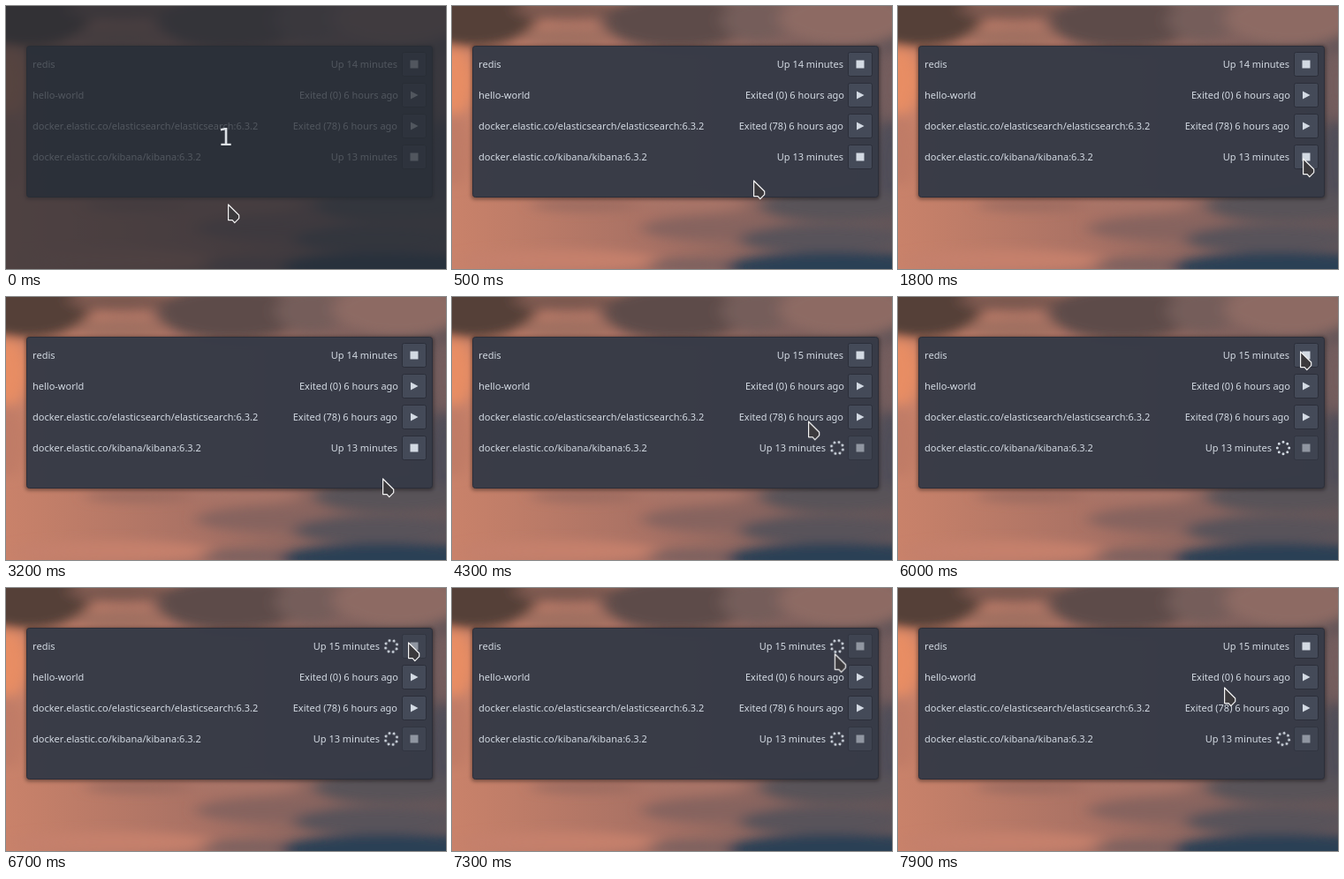
These frames come from a looping animation (498x298 px, 8 s). An HTML page:

```html
<!DOCTYPE html>
<html lang="en">
<head>
<meta charset="utf-8">
<title>Container list</title>
<style>
  html, body { margin: 0; width: 100%; height: 100%; overflow: hidden; background: #6d5552; }
  svg { display: block; width: 498px; height: 298px; }

  .label { font: 11px "Noto Sans", "Open Sans", sans-serif; font-kerning: none; fill: #d3dae3; }
  .status { text-anchor: end; }
  .count { font: 27px "DejaVu Sans", sans-serif; fill: #dde1e6; text-anchor: middle; }
  .face { fill: #444a58; stroke: #2b2e39; }
  .icon { fill: #d3dae3; }

  /* One loop is 8 s; 1.25% is one 100 ms tick. */
  .veil, .minute14, .minute15, .press, .shift, .spin, .dim, .face.off, .pointer {
    animation: 8s step-end infinite;
  }
  .veil { animation-name: veil; }
  .minute14 { animation-name: before; }
  .minute15 { animation-name: after; }
  .spin { opacity: 0; }

  .kibana .press { animation-name: pressKibana; }
  .kibana .shift { animation-name: shiftKibana; }
  .kibana .spin { animation-name: after; }
  .kibana .dim { animation-name: dimKibana; }
  .kibana .off { animation-name: offKibana; }

  .redis .press { animation-name: pressRedis; }
  .redis .shift { animation-name: shiftRedis; }
  .redis .spin { animation-name: spinRedis; }
  .redis .dim { animation-name: dimRedis; }
  .redis .off { animation-name: offRedis; }

  .ring { animation: turn 1s steps(10) infinite; }
  .pointer { animation-name: travel; }

  @keyframes veil { 0% { opacity: 1 } 2.5%, 100% { opacity: 0 } }
  @keyframes before { 0% { opacity: 1 } 45%, 100% { opacity: 0 } }
  @keyframes after { 0% { opacity: 0 } 45%, 100% { opacity: 1 } }

  @keyframes pressKibana { 0%, 36.25%, 100% { opacity: 0 } 33.75% { opacity: 1 } }
  @keyframes shiftKibana { 0% { transform: none } 45%, 100% { transform: translateX(-20px) } }
  @keyframes dimKibana { 0% { opacity: 1 } 45%, 100% { opacity: .55 } }
  @keyframes offKibana { 0% { fill: #444a58; stroke: #2b2e39 } 45%, 100% { fill: #3f4451; stroke: #313540 } }

  @keyframes pressRedis { 0%, 75%, 100% { opacity: 0 } 72.5% { opacity: 1 } }
  @keyframes shiftRedis { 0%, 93.75%, 100% { transform: none } 81.25% { transform: translateX(-20px) } }
  @keyframes spinRedis { 0%, 93.75%, 100% { opacity: 0 } 81.25% { opacity: 1 } }
  @keyframes dimRedis { 0%, 93.75%, 100% { opacity: 1 } 81.25% { opacity: .55 } }
  @keyframes offRedis { 0%, 93.75%, 100% { fill: #444a58; stroke: #2b2e39 } 81.25% { fill: #3f4451; stroke: #313540 } }

  @keyframes turn { to { transform: rotate(360deg) } }

  @keyframes travel {
    0% { transform: translate(252px, 225px) }
    1.25% { transform: translate(252px, 225px); animation-timing-function: steps(4) }
    6.25% { transform: translate(342px, 198px); animation-timing-function: steps(5) }
    12.5% { transform: translate(451px, 173px); animation-timing-function: steps(2) }
    15% { transform: translate(452px, 168px) }
    16.25% { transform: translate(452px, 168px); animation-timing-function: steps(5) }
    22.5% { transform: translate(459px, 173px) }
    35% { transform: translate(459px, 173px); animation-timing-function: steps(4) }
    40% { transform: translate(427px, 206px); animation-timing-function: steps(2) }
    42.5% { transform: translate(428px, 208px) }
    46.25% { transform: translate(428px, 208px); animation-timing-function: steps(7) }
    55% { transform: translate(400px, 130px); animation-timing-function: steps(8) }
    65% { transform: translate(452px, 62px); animation-timing-function: steps(2) }
    67.5% { transform: translate(456px, 62px) }
    88.75% { transform: translate(455px, 62px); animation-timing-function: steps(8) }
    98.75%, 100% { transform: translate(370px, 113px) }
  }
</style>
</head>
<body>
<svg viewBox="0 0 498 298">
  <defs>
    <linearGradient id="dusk" x2="1" y2="0">
      <stop offset="0" stop-color="#c9826a"/>
      <stop offset=".45" stop-color="#a87164"/>
      <stop offset="1" stop-color="#635558"/>
    </linearGradient>
    <filter id="soft" x="-50%" y="-50%" width="200%" height="200%">
      <feGaussianBlur stdDeviation="9 6"/>
    </filter>
    <filter id="shade" x="-10%" y="-10%" width="120%" height="120%">
      <feGaussianBlur stdDeviation="2"/>
    </filter>
    <rect id="stop" x="-4.5" y="-4.5" width="9" height="9"/>
    <path id="play" d="M-4 -4.5 L4.5 0 L-4 4.5Z"/>
    <rect id="button" x="-13.5" y="-13.5" width="27" height="27" rx="2"/>
    <circle id="dots" r="6.7" pathLength="8" fill="none" stroke="#d3dae3" stroke-width="3"
      stroke-linecap="round" stroke-dasharray="0 1"/>
  </defs>

  <!-- Sunset clouds -->
  <rect width="498" height="298" fill="url(#dusk)"/>
  <g filter="url(#soft)">
    <ellipse cx="25" cy="12" rx="70" ry="34" fill="#553f39"/>
    <ellipse cx="130" cy="4" rx="60" ry="12" fill="#7c584f"/>
    <ellipse cx="130" cy="36" rx="50" ry="12" fill="#a06f60"/>
    <ellipse cx="255" cy="18" rx="85" ry="30" fill="#5d4b49"/>
    <ellipse cx="345" cy="16" rx="40" ry="25" fill="#755d5a"/>
    <ellipse cx="445" cy="14" rx="75" ry="30" fill="#8d6a64"/>
    <ellipse cx="2" cy="85" rx="24" ry="38" fill="#e88d63"/>
    <ellipse cx="2" cy="165" rx="22" ry="40" fill="#c07c66"/>
    <ellipse cx="496" cy="90" rx="20" ry="40" fill="#755d5d"/>
    <ellipse cx="496" cy="180" rx="20" ry="50" fill="#4f4d59"/>
    <ellipse cx="150" cy="226" rx="60" ry="7" fill="#9c6c60"/>
    <ellipse cx="270" cy="224" rx="65" ry="8" fill="#a97567"/>
    <ellipse cx="290" cy="252" rx="75" ry="13" fill="#86645f"/>
    <ellipse cx="435" cy="226" rx="85" ry="18" fill="#585258"/>
    <ellipse cx="420" cy="264" rx="95" ry="16" fill="#59535a"/>
    <ellipse cx="120" cy="288" rx="115" ry="12" fill="#c5806c"/>
    <ellipse cx="270" cy="294" rx="50" ry="8" fill="#7b605f"/>
    <ellipse cx="435" cy="296" rx="125" ry="17" fill="#2c4055"/>
  </g>

  <!-- Panel -->
  <rect x="22" y="45" width="462" height="174" rx="4" opacity=".4" filter="url(#shade)"/>
  <rect x="23.5" y="45.5" width="459" height="171" rx="3" fill="#383c48" fill-opacity=".96" stroke="#2b2e39"/>

  <g class="redis">
    <text class="label" x="30" y="70">redis</text>
    <g class="shift">
      <text class="label status minute14" x="443" y="70">Up 14 minutes</text>
      <text class="label status minute15" x="443" y="70">Up 15 minutes</text>
    </g>
    <g class="spin" transform="translate(436 66)"><g class="ring"><use href="#dots"/></g></g>
    <g transform="translate(462 66)">
      <use href="#button" class="face off"/>
      <use href="#button" class="press" fill="#5294e2" stroke="#2b2e39" opacity="0"/>
      <use href="#stop" class="icon dim"/>
    </g>
  </g>

  <g>
    <text class="label" x="30" y="105">hello-world</text>
    <text class="label status" x="444" y="105">Exited (0) 6 hours ago</text>
    <g transform="translate(462 101)">
      <use href="#button" class="face"/>
      <use href="#play" class="icon"/>
    </g>
  </g>

  <g>
    <text class="label" x="30" y="140">docker.elastic.co/elasticsearch/elasticsearch:6.3.2</text>
    <text class="label status" x="443" y="140">Exited (78) 6 hours ago</text>
    <g transform="translate(462 136)">
      <use href="#button" class="face"/>
      <use href="#play" class="icon"/>
    </g>
  </g>

  <g class="kibana">
    <text class="label" x="30" y="175">docker.elastic.co/kibana/kibana:6.3.2</text>
    <g class="shift">
      <text class="label status" x="443" y="175">Up 13 minutes</text>
    </g>
    <g class="spin" transform="translate(436 171)"><g class="ring"><use href="#dots"/></g></g>
    <g transform="translate(462 171)">
      <use href="#button" class="face off"/>
      <use href="#button" class="press" fill="#5294e2" stroke="#2b2e39" opacity="0"/>
      <use href="#stop" class="icon dim"/>
    </g>
  </g>

  <!-- Countdown -->
  <g class="veil">
    <rect width="498" height="298" fill="#282d35" fill-opacity=".76"/>
    <text class="count" x="248.5" y="158">1</text>
  </g>

  <g class="pointer">
    <path d="M-.4 0 V17.6 H4.2 L6.8 20.6 L11.7 15.6 V12Z"
      fill="#3b393c" stroke="#f4f4f4" stroke-width="1.2" stroke-linejoin="round"/>
  </g>
</svg>
</body>
</html>
```
